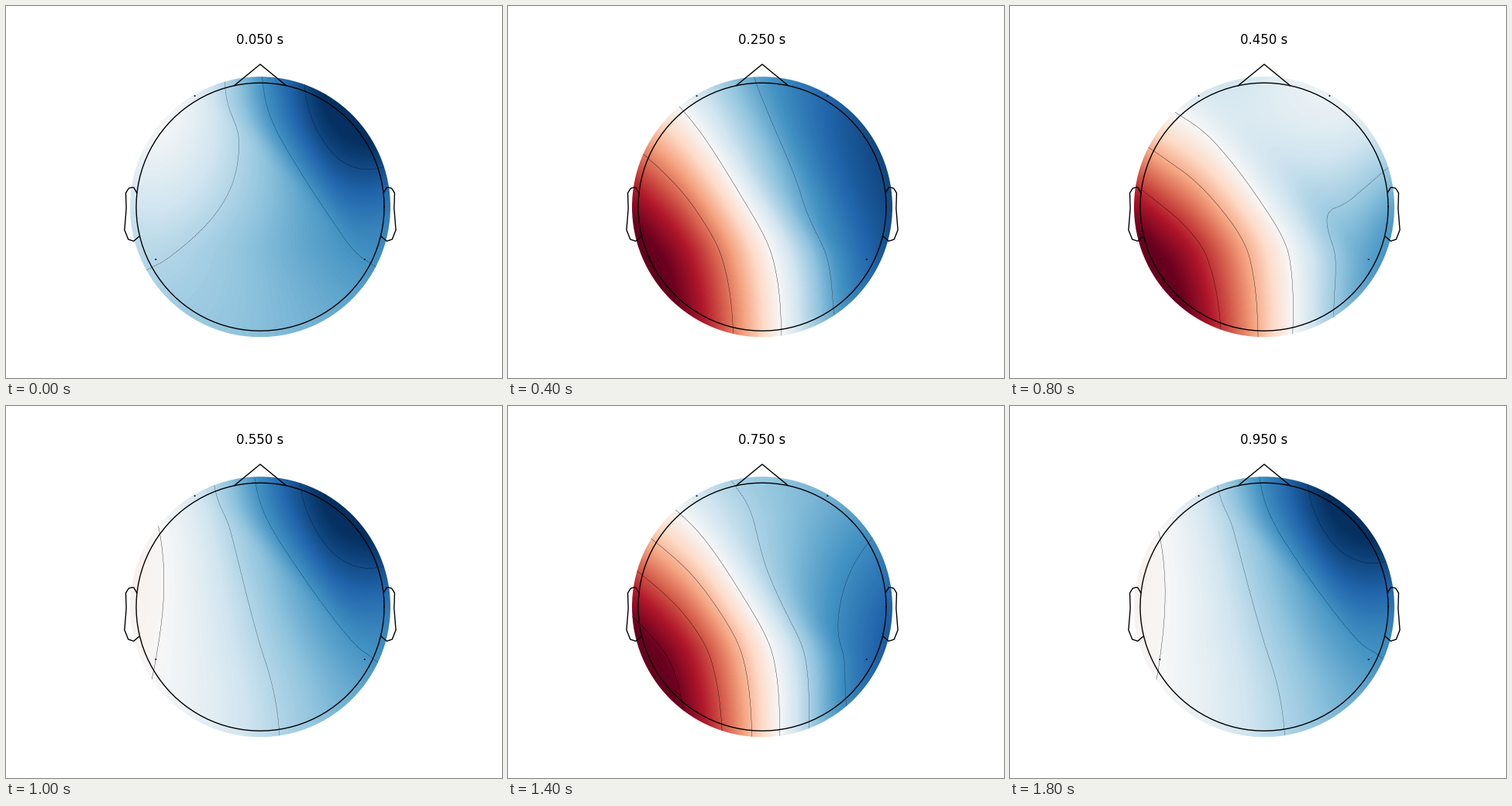
Write a matplotlib script that moves like this. It is 640 by 480 pixels and loops after 2000 ms.

```python
import matplotlib.pyplot as plt
import numpy as np
from matplotlib.animation import FuncAnimation
from matplotlib.patches import Circle
from matplotlib.tri import Triangulation

W, H, DPI = 640, 480, 100
CX, CY = 328, 220.8          # head centre, pixels from the lower left
HEAD, CLIP = 160, 168
FRAMES, INTERVAL = 10, 200
LEVEL_STEP = 20              # microvolts between contour lines

FRONT, BACK = np.array([84.4, 143.2]), np.array([134.7, -67.8])
MIRROR = np.array([-1, 1])
# the tiny lift settles which diagonal splits the four sensors
SENSORS = np.array([FRONT * MIRROR, FRONT + [0, 0.2], BACK * MIRROR, BACK])


def signals(n):
    """Microvolts at front left, front right, back left, back right."""
    keys = [0, 1, 3, 4, 5, 7, 9]
    front_left = -5 - 0.85 * n + 2.5 * np.cos(2 * np.pi * (n - 3) / 5)
    front_right = np.interp(n, keys, [-67, -8, -53, -3.4, -67.5, -30.5, -66])
    back_left = np.interp(n, keys, [-19.5, 62, 15, 56, 0, 63.5, 0])
    back_right = np.interp(n, keys, [-40, -38.5, -21, -29.7, -39, -48, -38.5])
    return np.array([front_left, front_right, back_left, back_right])


class CloughTocher:
    """C1 cubic interpolation with minimum-curvature gradients."""

    def __init__(self, pts, x, y):
        self.pts = pts
        self.tri = Triangulation(*pts.T)
        self.shape = x.shape
        self.grid = np.c_[x.ravel(), y.ravel()]
        self.where = self.tri.get_trifinder()(*self.grid.T)

    def bary(self, t, p):
        a, b, c = self.pts[self.tri.triangles[t]]
        uv = np.linalg.solve(np.c_[b - a, c - a], (p - a).T)
        return np.array([1 - uv[0] - uv[1], uv[0], uv[1]])

    def gradients(self, f):
        n = len(f)
        A, rhs = np.zeros((2 * n, 2 * n)), np.zeros(2 * n)
        for i, j in np.r_[self.tri.edges, self.tri.edges[:, ::-1]]:
            e = self.pts[j] - self.pts[i]
            cube = np.hypot(*e) ** 3
            row, col = slice(2 * i, 2 * i + 2), slice(2 * j, 2 * j + 2)
            A[row, row] += 4 * np.outer(e, e) / cube
            A[row, col] += 2 * np.outer(e, e) / cube
            rhs[row] += 6 * (f[j] - f[i]) * e / cube
        return np.linalg.solve(A, rhs).reshape(n, 2)

    def edge_weight(self, t, k):
        u, v = (k + 1) % 3, (k + 2) % 3
        other = self.tri.neighbors[t, u]
        if other < 0:
            return -0.5
        c = self.bary(t, self.pts[self.tri.triangles[other]].mean(axis=0))
        return (2 * c[v] + c[u] - 1) / (2 - 3 * c[v] - 3 * c[u])

    def patch(self, t, f, grad, p):
        idx = self.tri.triangles[t]
        f, g, q = f[idx], grad[idx], self.pts[idx]
        fwd = f + np.sum(g * (np.roll(q, -1, 0) - q), axis=1) / 3
        back = f + np.sum(g * (np.roll(q, 1, 0) - q), axis=1) / 3
        mid = (f + fwd + back) / 3
        side = np.zeros(3)
        for k in range(3):
            u, v = (k + 1) % 3, (k + 2) % 3
            bend = -f[u] + 3 * fwd[u] - 3 * back[v] + f[v]
            side[k] = (self.edge_weight(t, k) * bend - f[u] + 2 * fwd[u]
                       - back[v] + mid[u] + mid[v]) / 2
        inner = (side.sum() - side + mid) / 3

        b = self.bary(t, p)
        low = b.min(axis=0)
        b, d = b - low, 3 * low
        w = d ** 3 * inner.mean()
        for i in range(3):
            u, v = (i + 1) % 3, (i + 2) % 3
            w = w + b[i] ** 3 * f[i] + 6 * b[u] * b[v] * d * side[i]
            w = w + 3 * b[i] ** 2 * (b[u] * fwd[i] + b[v] * back[i] + d * mid[i])
            w = w + 3 * b[i] * d ** 2 * inner[i]
        return w

    def __call__(self, f):
        grad = self.gradients(f)
        z = np.zeros(len(self.grid))
        for t in np.unique(self.where):
            inside = self.where == t
            z[inside] = self.patch(t, f, grad, self.grid[inside])
        return z.reshape(self.shape)


def with_border(values, edges, total):
    """Give each outer point the mean of the sensors it touches."""
    n = len(values)
    both = np.r_[edges, edges[:, ::-1]]
    outer, used = np.zeros(total - n), np.zeros(total - n, bool)
    for k in range(total - n):
        near = both[both[:, 0] == k + n, 1]
        near = near[near < n]
        if len(near):
            outer[k], used[k] = values[near].mean(), True
    outer[~used] = outer[used].mean()
    return np.r_[values, outer]


axis = np.linspace(-CLIP, CLIP, 64)
gx, gy = np.meshgrid(axis, axis)
ring = np.arange(12) * np.pi / 6
far = 1.1 * CLIP + 243
points = np.r_[SENSORS, far * np.c_[np.cos(ring), np.sin(ring)]]
surface = CloughTocher(points, gx, gy)

fig = plt.figure(figsize=(W / DPI, H / DPI), dpi=DPI, facecolor="white")
ax = fig.add_axes([0, 0, 1, 1])
image = ax.imshow(np.zeros_like(gx), cmap="RdBu_r", origin="lower",
                  extent=(-CLIP, CLIP, -CLIP, CLIP), interpolation="bilinear")
ax.axis("off")
ax.set(xlim=(-CX, W - CX), ylim=(-CY, H - CY))
disc = Circle((0, 0), CLIP, transform=ax.transData)
image.set_clip_path(disc)

ax.scatter(*SENSORS.T, s=0.25, marker="o", edgecolor="k", facecolor="none")


def outline(x, y):
    ax.plot(np.array(x) * HEAD, np.array(y) * HEAD, color="k", lw=1)


turn = np.linspace(0, 2 * np.pi, 101)
outline(np.cos(turn), np.sin(turn))
nose = np.deg2rad(12)
outline([-nose, 0, nose], [np.cos(nose), 1.15, np.cos(nose)])
ear = 2 * np.array([(0.497, 0.056), (0.510, 0.078), (0.518, 0.078),
                    (0.530, 0.075), (0.542, 0.056), (0.540, -0.006),
                    (0.547, -0.093), (0.532, -0.131), (0.510, -0.138),
                    (0.489, -0.120)])
for flip in (-1, 1):
    outline(flip * ear[:, 0], ear[:, 1])

title = ax.text(0, 209.9, "", fontsize=12, ha="center", va="baseline",
                family="DejaVu Sans")
lines = []


def draw(n):
    while lines:
        lines.pop().remove()
    values = signals(n)
    peak = np.abs(values).max()
    z = surface(with_border(values, surface.tri.edges, len(points)))
    image.set_data(z)
    image.set_clim(-peak, peak)
    cs = ax.contour(gx, gy, z, np.arange(-3, 4) * LEVEL_STEP,
                    colors="k", linewidths=0.25)
    cs.set_clip_path(disc)
    lines.append(cs)
    title.set_text(f"{0.05 + 0.1 * n:.3f} s")
    return [image, title]


anim = FuncAnimation(fig, draw, frames=FRAMES, interval=INTERVAL,
                     init_func=lambda: draw(0), repeat=True, repeat_delay=0)
plt.show()
```
